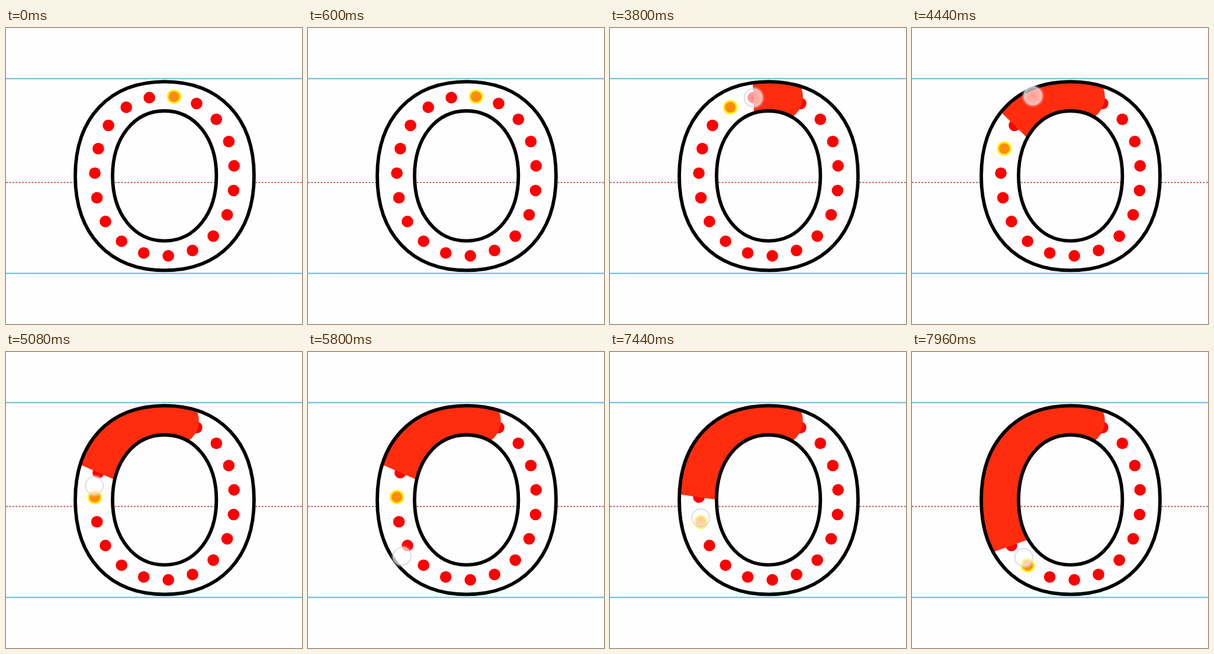
Write an HTML page that moves like this. It is 500 px wide and 500 px high and loops after 8000 ms.

```html
<!DOCTYPE html>
<html lang="en">
<head>
<meta charset="utf-8">
<title>Tracing the letter O</title>
<style>
  html, body { margin: 0; height: 100%; overflow: hidden; background: #fefefe; }
  svg { display: block; width: 100%; height: 100%; }
</style>
</head>
<body>
<svg viewBox="0 0 500 500">
  <defs>
    <clipPath id="ringClip"><path id="ringArea" clip-rule="evenodd"/></clipPath>
    <radialGradient id="glow">
      <stop offset="0" stop-color="#fff" stop-opacity=".54"/>
      <stop offset=".7" stop-color="#fff" stop-opacity=".66"/>
      <stop offset=".8" stop-color="#fff" stop-opacity=".35"/>
      <stop offset="1" stop-color="#fff" stop-opacity="0"/>
    </radialGradient>
  </defs>
  <path d="M0 85.5H500M0 414.5H500" stroke="#62bbdc" stroke-width="1.8"/>
  <path d="M0 260.8H500" stroke="#c84e60" stroke-width="1.7" stroke-dasharray="3 2.4"/>
  <path id="ring" fill="#fefefe" fill-rule="evenodd"/>
  <g id="dots" fill="#fe0000"></g>
  <circle id="next" r="10.6" fill="#ff8c0c" stroke="#fff000" stroke-width="3"/>
  <g id="paint" clip-path="url(#ringClip)">
    <circle r="42" fill="#ff2d0e"/>
    <polyline fill="none" stroke="#ff2d0e" stroke-width="84" stroke-linejoin="round"/>
  </g>
  <path id="outline" fill="none" stroke="#000" stroke-width="5.8"/>
  <g id="touch">
    <circle r="20" fill="url(#glow)"/>
    <circle r="15" fill="none" stroke="#c9cfea" stroke-opacity=".7" stroke-width="2"/>
  </g>
</svg>
<script>
const LOOP = 8000, DOTS = 19, STEP = 19, START = -7.2, ON_TRACK = 1.03;
const $ = id => document.getElementById(id);

// Finger: time, progress counted in dots, distance from the centre (1 = on the dots)
const finger = [
  [3600, 0, 1], [4220, 3.1, 1], [4440, 1.78, 1.12], [4960, 4.1, 1],
  [5800, 7.18, 1.135], [6160, 7.18, 1.1], [6750, 3.2, 1.02], [7000, 4.27, 1.02],
  [7960, 7.69, .96]
];

function oval(cx, cy, rx, ry, k) {
  const p = (x, y) => `${cx + x * rx} ${cy + y * ry}`;
  return `M${p(0, -1)}C${p(k, -1)} ${p(1, -k)} ${p(1, 0)}S${p(k, 1)} ${p(0, 1)}` +
         `S${p(-1, k)} ${p(-1, 0)}S${p(-k, -1)} ${p(0, -1)}Z`;
}

// Point on the slightly squared midline, counter-clockwise from the top
function onTrack(progress, distance = 1) {
  const base = (START + STEP * progress) * Math.PI / 180;
  const angle = base + .035 * Math.sin(2 * base);
  const r = distance * (1 + .025 * Math.sin(2 * angle) ** 2);
  return [268 - 118 * r * Math.sin(angle), 250 - 135 * r * Math.cos(angle)];
}

function fingerAt(t) {
  const i = finger.findIndex(key => key[0] > t);
  if (i < 0) return finger.at(-1).slice(1);
  const [t0, p0, d0] = finger[i - 1], [t1, p1, d1] = finger[i];
  const u = (t - t0) / (t1 - t0);
  return [p0 + (p1 - p0) * u, d0 + (d1 - d0) * u];
}

// Dots count as collected once the finger has passed them on the track
function collected(t) {
  let count = 0;
  for (let s = finger[0][0]; s <= t; s += 20) {
    const [progress, distance] = fingerAt(s);
    if (distance < ON_TRACK) count = Math.max(count, Math.floor(progress) + 1);
  }
  return count;
}

function place(el, [x, y]) {
  el.setAttribute('transform', `translate(${x} ${y})`);
}

const letter = oval(268, 250, 151, 159.3, .615) + oval(267.7, 249.8, 87.7, 109.8, .585);
for (const id of ['ringArea', 'ring', 'outline']) $(id).setAttribute('d', letter);

const dots = Array.from({ length: DOTS }, (_, i) => onTrack(i));
$('dots').innerHTML = dots.map(([x, y]) => `<circle cx="${x}" cy="${y}" r="9.8"/>`).join('');
const [cap, stroke] = $('paint').children;
place(cap, dots[0]);

function draw() {
  const t = performance.now() % LOOP;
  const count = collected(t);
  place($('next'), dots[count]);
  $('dots').childNodes.forEach((dot, i) => dot.style.display = i === count ? 'none' : '');
  $('paint').style.display = count ? '' : 'none';
  stroke.setAttribute('points', dots.slice(0, count).join(' '));

  const touching = t >= finger[0][0];
  $('touch').style.display = touching ? '' : 'none';
  if (touching) place($('touch'), onTrack(...fingerAt(t)));
  requestAnimationFrame(draw);
}
draw();
</script>
</body>
</html>
```
